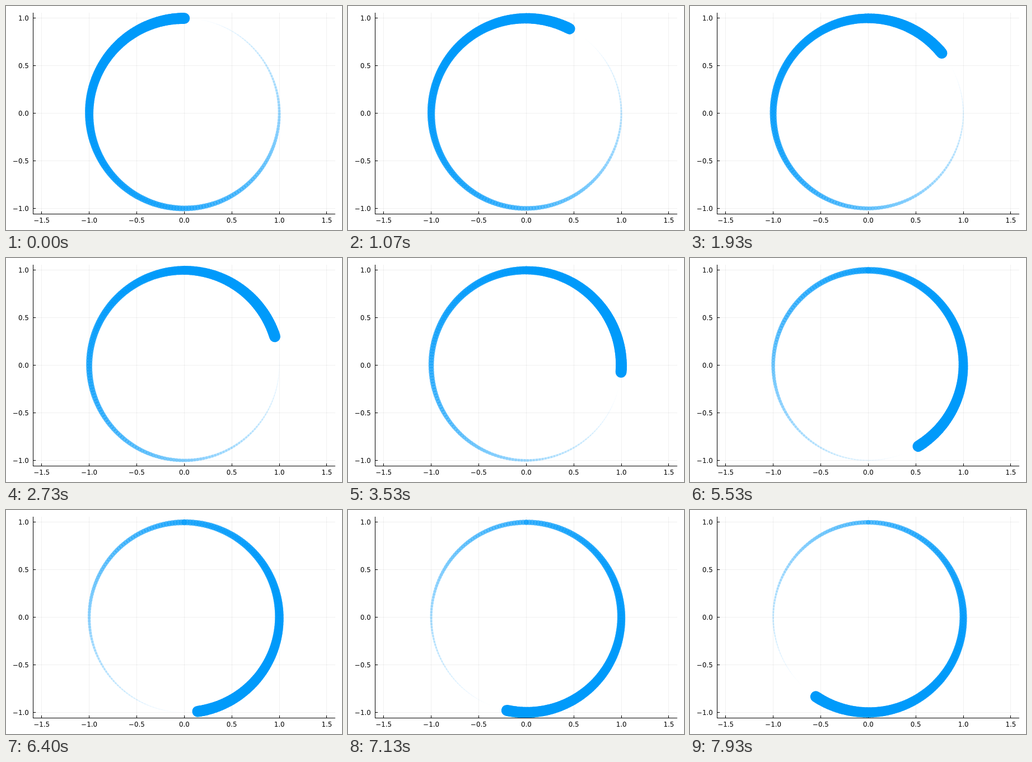
An HTML page with a canvas for the animation above (8000 ms loop, 600 px wide and 400 px high).

```html
<!DOCTYPE html>
<html lang="en">
<head>
<meta charset="utf-8">
<title>Circle plot</title>
<style>
  html, body { margin: 0; width: 100%; height: 100%; overflow: hidden; background: #fff; }
  svg, canvas { position: absolute; left: 0; top: 0; width: 600px; height: 400px; }
  text { font: 11.8px "DejaVu Sans", sans-serif; fill: #000; }
  .grid { stroke: #000; stroke-opacity: .06; }
  .axis { stroke: #000; }
</style>
</head>
<body>
<svg id="axes" viewBox="0 0 600 400"></svg>
<canvas id="plot" width="600" height="400"></canvas>
<script>
const CX = 318.3, CY = 191.7, UNIT = 169.72;
const LEFT = 48, RIGHT = 588, TOP = 12, BOTTOM = 371.5;
const POINTS = 200, MAX_WIDTH = 20, LOOP = 8000;

const px = x => CX + x * UNIT;
const py = y => CY - y * UNIT;
const crisp = v => Math.floor(v) + 0.5;
const label = v => v.toFixed(1).replace("-", "\u2212");

function drawAxes() {
  const line = (cls, x1, y1, x2, y2) =>
    `<line class="${cls}" x1="${x1}" y1="${y1}" x2="${x2}" y2="${y2}"/>`;
  const text = (anchor, x, y, s) =>
    `<text text-anchor="${anchor}" x="${x}" y="${y}">${s}</text>`;
  let grid = "", marks = "";

  for (let v = -1.5; v <= 1.5; v += 0.5) {
    const x = crisp(px(v));
    grid += line("grid", x, TOP, x, BOTTOM);
    marks += line("axis", x, BOTTOM, x, BOTTOM - 4.7) + text("middle", px(v), 387.4, label(v));
    if (Math.abs(v) > 1) continue;
    const y = crisp(py(v));
    grid += line("grid", LEFT, y, RIGHT, y);
    marks += line("axis", LEFT + 0.5, y, LEFT + 5.2, y) + text("end", 40.7, py(v) + 4.3, label(v));
  }
  marks += line("axis", LEFT, BOTTOM, RIGHT, BOTTOM) + line("axis", LEFT + 0.5, TOP, LEFT + 0.5, BOTTOM);
  document.getElementById("axes").innerHTML = grid + marks;
}

const ctx = document.getElementById("plot").getContext("2d");
ctx.lineCap = "round";
ctx.strokeStyle = "#009afa";

function point(index) {
  const angle = (index % POINTS) / (POINTS - 1) * 2 * Math.PI;
  return [px(Math.sin(angle)), py(Math.cos(angle))];
}

// Each segment is stroked alone so that its translucent round caps overlap.
function drawCircle(shift) {
  ctx.clearRect(0, 0, 600, 400);
  for (let i = 1; i < POINTS - 1; i++) {
    const strength = i / (POINTS - 1);
    const [x1, y1] = point(shift + i);
    const [x2, y2] = point(shift + i + 1);
    ctx.globalAlpha = strength;
    ctx.lineWidth = strength * MAX_WIDTH;
    ctx.beginPath();
    ctx.moveTo(x1, y1);
    ctx.lineTo(x2 + 0.001, y2); // keeps the zero-length closing segment visible
    ctx.stroke();
  }
}

// 15 steps per second, with step times rounded to 10 ms.
const stepAt = ms => Math.floor(Math.floor((ms % LOOP) / 10) * 0.15 + 0.051);

let shown = -1;
const start = performance.now();
function tick() {
  const step = stepAt(performance.now() - start);
  if (step !== shown) drawCircle(shown = step);
  requestAnimationFrame(tick);
}

drawAxes();
tick();
</script>
</body>
</html>
```
